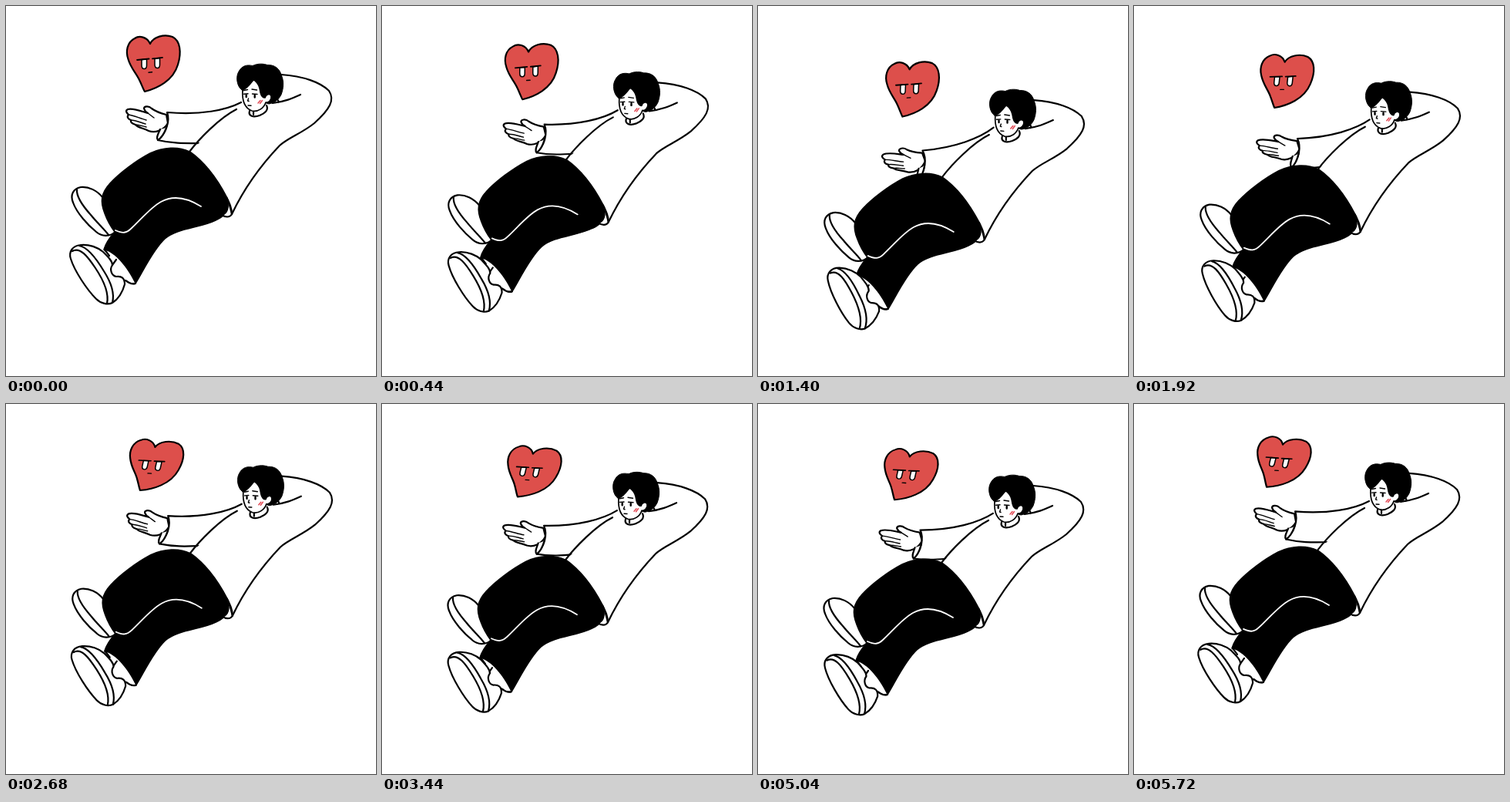
Animation of 480x480 px, one loop 5.76 s. Source, as an HTML page:

```html
<!DOCTYPE html>
<html lang="en">
<head>
<meta charset="utf-8">
<title>Floating with a heart</title>
<style>
html, body { margin: 0; width: 100%; height: 100%; overflow: hidden; background: #fff; }
svg { display: block; width: 100vw; height: 100vh; }
path { stroke: #000; stroke-width: 2.2; stroke-linecap: round; stroke-linejoin: round; fill: #fff; }
.line { fill: none; }
.black { fill: #000; stroke-width: 1.6; }
.fill { stroke: none; }
.thin { fill: none; stroke-width: 1.4; }
</style>
</head>
<body>
<svg viewBox="0 0 480 480">
  <g id="heart">
    <path style="fill:#dd4f4b" d="M187 49C183 40 173 38 167 42C157 47 155 59 158.500 69C162 81 169 87 173 96C176 102 178 108 180 111C196 107 217 97 223 76C228 60 226 45 216 40C205 36 191 40 187 49Z"/>
    <path style="stroke-width:1.5" d="M176 69.500V77Q176 81.500 179.300 81.500Q182.500 81.500 182.500 77V69ZM193 68.500V76Q193 80.500 196.500 80.500Q199.500 80.500 199.500 76V67.500Z"/>
    <path class="line" style="stroke-width:1.8" d="M170 70L185.500 68.500M190 68.300L203 66.800"/>
    <path class="thin" d="M185 86.200L189.500 85.800"/>
  </g>

  <g id="body">
    <g id="arm">
      <path d="M208 141C200 139 193 136 189 133C185 129 179 130 179 133C180 136 182 138 184 139C177 137 165 132 158 134C154 136 157 139 159 141C156 144 159 147 162 148C161 152 165 153 168 154C171 158 178 158 185 162C193 165 204 162 210 152Z"/>
      <path class="thin" d="M184 139C187 141 189 143 192 145M159 141C166 142 174 146 182 148M162 148C168 148 174 151 181 153M168 154C173 154 177 156 182 157"/>
      <path d="M305 125C286 135 252 142 209 138C213 149 208 165 197 174C218 179 236 178 254 178"/>
      <path d="M208 158C205 166 202 171 197 174C194 171 198 165 200 160"/>
    </g>

    <path d="M97 235C87 237 83 245 87 255C92 269 107 285 117 293C124 299 134 300 142 293L126 249C118 239 107 234 97 235Z"/>
    <path class="line" d="M92 238C91 248 101 261 110 271C118 281 128 290 133 297"/>

    <path class="black" d="M238 189C224 182 204 183 187 191C168 201 147 217 135 230C123 243 122 254 128 269C132 280 138 289 141 293C134 301 129 309 127 316C140 325 153 343 158 357C161 360 165 361 168 360C177 346 190 317 206 302C222 288 252 288 272 278C284 273 290 264 286 250C275 225 259 203 238 189Z"/>
    <path class="line" style="stroke:#fff;stroke-width:1.8" d="M142 291C151 295 156 295 162 289C175 277 188 261 201 254C219 244 237 250 253 260"/>

    <path class="fill" d="M129 317C141 320 157 338 167 359Q161 360 156 355L135 335Z"/>
    <path class="line" d="M128 316L134 324M138 336L143 329M168 360Q162 362 155 356"/>
    <g id="foot">
      <path d="M97 310C86 311 81 319 84 328C89 344 105 368 117 380C123 386 132 388 138 385C146 380 151 372 154 361C154 353 150 350 143 351C137 350 134 342 138 336C138 331 133 326 126 319C119 313 108 309 97 310Z"/>
      <path class="line" d="M86 318C96 312 106 325 116 340C126 355 134 372 131 386M95 311C107 313 118 329 127 344C136 358 141 373 138 385"/>
    </g>

    <path class="fill" d="M238 189L299 134L308 124L357 89C386 91 408 99 419 110C427 122 420 134 400 152C384 165 366 171 355 181C335 202 312 230 293 270L286 248C274 225 258 203 238 189Z"/>
    <path d="M286 248C290 256 293 262 293 270C290 275 284 274 280 271C287 269 290 261 286 248Z"/>
    <path class="line" d="M238 189C250 173 277 145 299 134M357 89C386 91 408 99 419 110C427 122 420 134 400 152C384 165 366 171 355 181C335 202 312 230 293 270C291 262 290 256 286 248C274 225 258 203 238 189M346 126C362 124 371 120 382 115M348 121C352 120 354 122 353 125"/>

    <path class="fill" d="M314 133L321 143L338 136L342 123Z"/>
    <path class="line" d="M316 136C314 143 321 145 329 142C336 139 341 135 338 129"/>
    <path class="black" style="stroke-width:1" d="M306 109C299 104 298 91 302 85C306 77 313 76 320 77.500C327 74 335 75 339 76.500C349 76 355 82 357 89C361 98 360 107 357 115C353 123 347 126 341 127L310 118Z"/>
    <path style="stroke-width:1.7" d="M307 109C312 107 317 101 320 97C322 95 323 97 325 99C329 103 329 106 330 112C331 116 333 119 336 119C337 114 343 113 344 117C345 122 340 126 337 125C335 132 327 138 319 136C311 133 306 124 307 109Z"/>
    <path class="line" d="M321 137V141"/>
    <path class="thin" d="M308.500 109.500L313.500 108.500M319 108L325.500 109M308.500 114.200L314 113.800M319.500 114L326 114.500M314.500 120L313.500 123L315 123.500M314 129L318 129.300"/>
    <path class="line" style="stroke-width:2.4" d="M311.700 115.500V118M322.700 115.800V118.500"/>
    <path class="line" style="stroke:#e34b56;stroke-width:1.5" d="M327 126L330 122.500M329.500 126.500L332.500 122.500"/>
  </g>
</svg>
<script>
const LOOP = 5760, HALF = 1440;
const leans = [0, 0.15, 1, 0.8, 1]; // how far the heart leans at each turn of the bob
const $ = id => document.getElementById(id);
const move = (id, value) => $(id).setAttribute('transform', value);

function draw(now) {
  const t = Math.floor(now % LOOP / 40) * 40;
  const leg = Math.floor(t / HALF), part = t / HALF - leg;
  const p = leg % 2 ? 1 - part : part;
  const lean = leans[leg] + (leans[leg + 1] - leans[leg]) * part;
  const y = 34 * p;
  const drift = t > 0 && t < 2 * HALF ? 0.8 : 0;

  move('body', `translate(${drift} ${y})`);
  move('arm', `rotate(${-10.5 * p} 303 126)`);
  move('foot', `rotate(${6 * p} 134 384)`);
  move('heart', `translate(${191.5 + 9 * p} ${74.5 + y + lean}) rotate(${9 * lean})
    skewX(${-5 * lean}) scale(1 ${1 - 0.07 * lean}) translate(-191.5 -74.5)`);
}

const start = performance.now();
function tick() {
  draw(performance.now() - start);
  requestAnimationFrame(tick);
}
tick();
</script>
</body>
</html>
```
